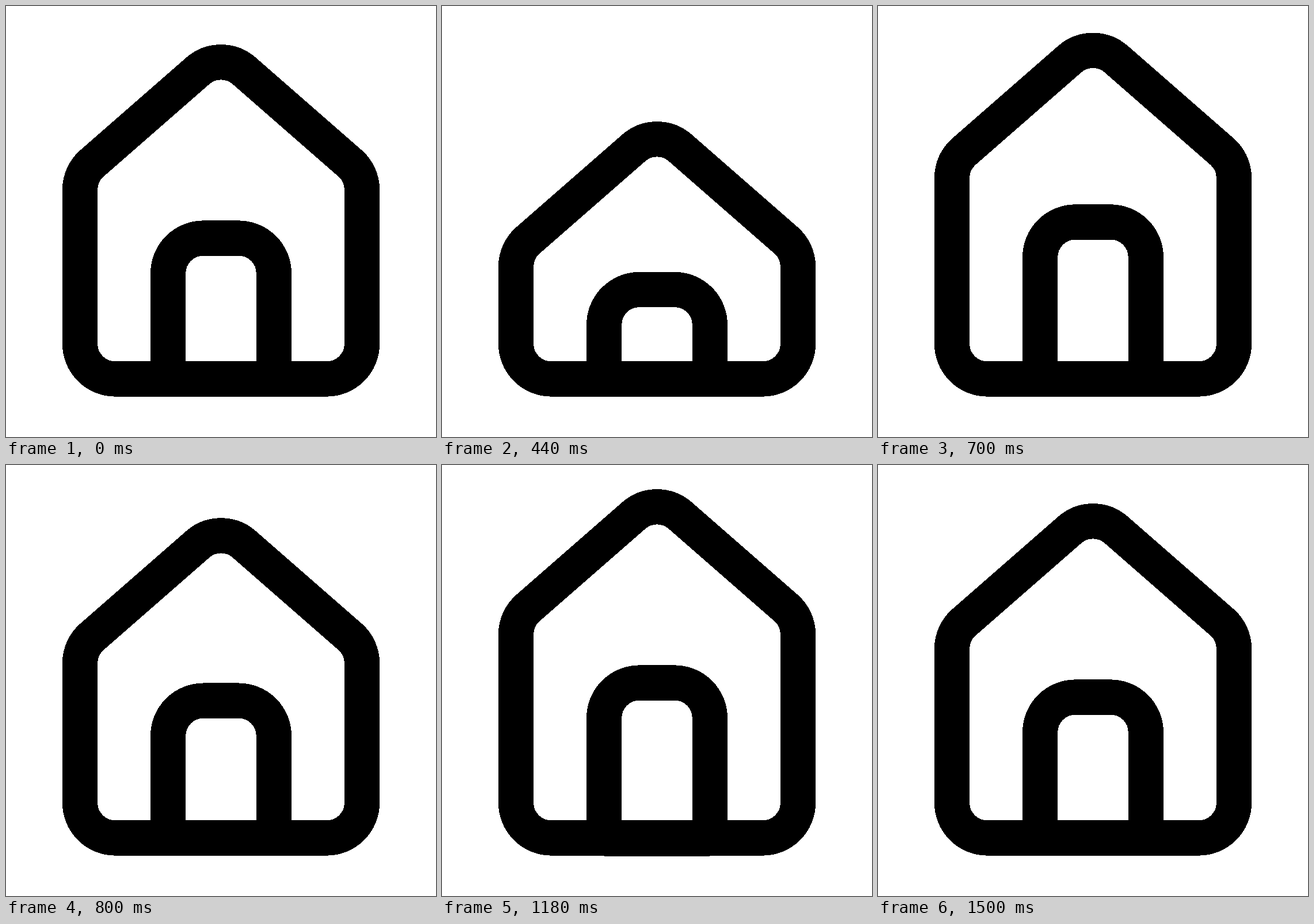
Write an HTML page that moves like this. It is 747 px wide and 750 px high and loops after 3.02 s.

```html
<!DOCTYPE html>
<html lang="en">
<head>
<meta charset="utf-8">
<title>Bouncing house</title>
<style>
  html, body { margin: 0; width: 100%; height: 100%; overflow: hidden; background: #fff; }
  svg { display: block; width: 747px; height: 750px; }
  path { fill: none; stroke: #000; stroke-width: 61.25; stroke-linejoin: bevel; shape-rendering: crispEdges; }
</style>
</head>
<body>
<svg viewBox="0 0 747 750">
  <path id="wall"/>
  <path id="door"/>
</svg>
<script>
const LOOP = 3020, STEP = 20;

// time in ms, vertical shift of the roof, of the door top, of the sill
const keys = [
  [0, 0, 0, 0],
  [442, 134, 89.5, 0],
  [582, -51, -51, 0],
  [907, 51, 25.5, 0],
  [1175, -25, -25, 0.9],
  [1500, 0, 0, 0]
];

const U = 30.625, R = 2 * U, MID = 373.5, BASE = 649;
const LEN = Math.hypot(8, 7);
const NX = R * 7 / LEN, NY = R * 8 / LEN;   // roof normal, scaled to the corner radius
const wall = document.getElementById('wall');
const door = document.getElementById('door');

function pose(t) {
  const i = keys.findIndex(k => k[0] > t);
  if (i < 0) return [0, 0, 0];
  const a = keys[i - 1], b = keys[i];
  const u = (t - a[0]) / (b[0] - a[0]);
  const e = u * u * (3 - 2 * u);
  return [1, 2, 3].map(n => a[n] + (b[n] - a[n]) * e);
}

const arc = (x, y) => `A${R} ${R} 0 0 1 ${x} ${y}`;

function wallPath(dy) {
  const l = MID - 8 * U, r = MID + 8 * U;
  const apex = BASE - 16 * U + dy;
  const eave = apex + (8 * U - R) * 7 / 8;
  return `M${l} ${eave}` + arc(l + R - NX, eave - NY) +
    `L${MID - NX} ${apex - NY}` + arc(MID + NX, apex - NY) +
    `L${r - R + NX} ${eave - NY}` + arc(r, eave) +
    `V${BASE - R}` + arc(r - R, BASE) +
    `H${l + R}` + arc(l, BASE - R) + 'Z';
}

function doorPath(dy, sill) {
  const l = MID - 3 * U, r = MID + 3 * U;
  const top = BASE - 8 * U + dy, floor = BASE + sill;
  return `M${l} ${floor}V${top + R}` + arc(l + R, top) +
    `H${r - R}` + arc(r, top + R) + `V${floor}Z`;
}

function draw(now) {
  const t = Math.floor((now % LOOP) / STEP) * STEP;
  const [roof, lintel, sill] = pose(t);
  wall.setAttribute('d', wallPath(roof));
  door.setAttribute('d', doorPath(lintel, sill));
}

const start = performance.now();
function tick() {
  draw(performance.now() - start);
  requestAnimationFrame(tick);
}
tick();
</script>
</body>
</html>
```
